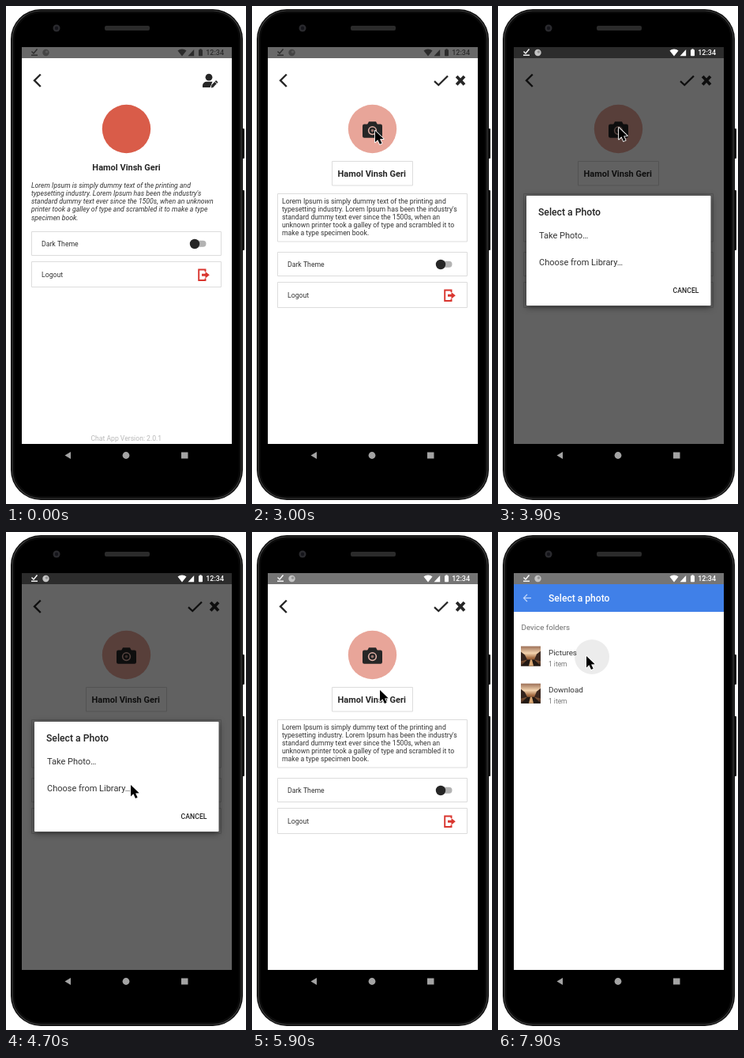
Animation, 304 px wide and 630 px high, one loop 8000 ms. Source, as an HTML page with a canvas:

```html
<!DOCTYPE html>
<html lang="en">
<head>
<meta charset="utf-8">
<title>Chat app profile</title>
<style>
html, body { margin: 0; width: 100%; height: 100%; overflow: hidden; background: #fff; }
canvas { display: block; width: 304px; height: 630px; }
</style>
</head>
<body>
<canvas id="stage"></canvas>
<script>
const W = 304, H = 630, LOOP = 8000;
const canvas = document.getElementById('stage');
const c = canvas.getContext('2d');
const ratio = window.devicePixelRatio || 1;
canvas.width = W * ratio;
canvas.height = H * ratio;

const INK = '#262626', RED = '#d9352e';
const BIO = ['Lorem Ipsum is simply dummy text of the printing and',
  "typesetting industry. Lorem Ipsum has been the industry's"];
const BIO_VIEW = [...BIO, 'standard dummy text ever since the 1500s, when an unknown',
  'printer took a galley of type and scrambled it to make a type', 'specimen book.'];
const BIO_EDIT = [...BIO, 'standard dummy text ever since the 1500s, when an',
  'unknown printer took a galley of type and scrambled it to', 'make a type specimen book.'];
const NAME = 'Hamol Vinsh Geri';

// time, x, y of the pointer tip
const PATH = [[300, 270, 640], [1000, 237, 168], [1300, 237, 168], [1780, 260, 93],
  [2200, 260, 93], [2950, 156, 158], [3400, 153, 154], [3900, 153, 154], [4500, 158, 320],
  [5300, 158, 320], [5850, 162, 200], [6400, 162, 200], [7200, 112, 157], [8000, 112, 157]];

const ramp = (t, a, b) => Math.min(1, Math.max(0, (t - a) / (b - a)));
const smooth = p => p * p * (3 - 2 * p);

function box(x, y, w, h, fill, r = 0) {
  c.fillStyle = fill;
  c.beginPath();
  c.roundRect(x, y, w, h, r);
  c.fill();
}

function frame(x, y, w, h, color = '#dcdcdc', r = 0, width = 1) {
  c.strokeStyle = color;
  c.lineWidth = width;
  c.beginPath();
  c.roundRect(x, y, w, h, r);
  c.stroke();
}

function disc(x, y, r, fill) {
  c.fillStyle = fill;
  c.beginPath();
  c.arc(x, y, r, 0, 7);
  c.fill();
}

function trace(pts) {
  c.beginPath();
  for (let i = 0; i < pts.length; i += 2) c.lineTo(pts[i], pts[i + 1]);
}

function poly(fill, ...pts) {
  trace(pts);
  c.fillStyle = fill;
  c.fill();
}

function line(color, width, ...pts) {
  trace(pts);
  c.strokeStyle = color;
  c.lineWidth = width;
  c.stroke();
}

function text(str, x, y, size = 8.7, color = '#333', style = '400', align = 'left') {
  c.font = `${style} ${size}px Roboto, sans-serif`;
  c.textAlign = align;
  c.fillStyle = color;
  c.fillText(str, x, y);
}

function phone() {
  box(0, 0, W, H, '#fff');
  box(298, 155, 4, 38, '#111', 1);
  box(298, 233, 4, 76, '#111', 1);
  box(6, 4, 294, 621, '#0a0a0a', 38);
  frame(8, 6, 290, 617, '#3b3b3b', 36, 1.2);
  box(11, 9, 284, 611, '#000', 33);
  box(125, 25, 57, 6, '#2b2b2b', 2);
  disc(64, 28, 4.5, '#2a2a2e');
  disc(64, 28, 2.2, '#15151b');
  poly('#a3a3a3', 82, 564, 82, 573, 74.5, 568.5);
  disc(152, 568.5, 4.4, '#a3a3a3');
  box(222, 564.5, 8.5, 8, '#a3a3a3');
}

function statusBar(light) {
  const ink = light ? '#fff' : '#2b2b2b';
  line(ink, 1.4, 32.5, 57.5, 35, 60, 39.5, 54.5);
  box(32, 61.5, 8, 1.4, ink);
  disc(50.5, 59, 4.2, light ? '#c4c4c4' : '#444');
  disc(51.5, 58, 1.8, light ? '#969696' : '#5a5a5a');
  poly(ink, 217.5, 56.5, 220, 55, 223, 54.5, 226, 55, 228.5, 56.5, 223, 63.5);
  poly(ink, 230.5, 63.2, 238.2, 63.2, 238.2, 55);
  box(244, 55.3, 5, 8, ink, .8);
  box(245.4, 54.3, 2.2, 1.5, ink);
  text('12:34', 276, 62.2, 9, ink, '500', 'right');
}

function editUserIcon() {
  disc(257, 90.2, 4.4, INK);
  c.beginPath();
  c.moveTo(249, 103);
  c.lineTo(249, 100);
  c.quadraticCurveTo(250, 96, 254, 95.8);
  c.lineTo(261.5, 95.8);
  c.lineTo(258.5, 103);
  c.fill();
  line(INK, 3.4, 261.5, 101.3, 267.3, 95.3);
  poly(INK, 259.8, 103.5, 260.3, 99.8, 263.2, 102.8);
  line('#fff', .9, 264.3, 95.6, 267.3, 98.4);
}

function cameraIcon() {
  box(140, 149.5, 25, 17.2, INK, 2.2);
  poly(INK, 146, 150, 148, 146.3, 157, 146.3, 159, 150);
  disc(152.5, 157.6, 5.6, '#e6b5aa');
  disc(152.5, 157.6, 4.1, INK);
  disc(152.5, 157.6, 1.8, '#9c7670');
}

function options(y) {
  frame(32.5, y + .5, 240, 30);
  text('Dark Theme', 45, y + 19);
  box(238, y + 11.8, 15.5, 8, '#b3b3b3', 4);
  disc(239, y + 16, 6.2, INK);

  frame(32.5, y + 38.5, 240, 32);
  text('Logout', 45, y + 58);
  line(RED, 1.9, 252.5, y + 51, 252.5, y + 48.5, 244.2, y + 48.5,
    244.2, y + 62, 252.5, y + 62, 252.5, y + 59.5);
  line(RED, 3, 248, y + 55.2, 253.5, y + 55.2);
  poly(RED, 252.5, y + 51, 257.8, y + 55.2, 252.5, y + 59.4);
}

function profile(editing) {
  box(20, 66, 266, 488, '#fff');
  line(INK, 2.4, 43.8, 86.5, 36, 94.2, 43.8, 102);
  disc(152.5, 155.5, 30.7, editing ? '#e8a599' : '#d95c49');
  if (editing) {
    line(INK, 2.3, 231, 95.2, 236.3, 100, 248, 88.5);
    line(INK, 3.8, 259.2, 89, 269, 99.5);
    line(INK, 3.8, 269, 89, 259.2, 99.5);
    cameraIcon();
    frame(101.5, 196.5, 102, 30.5);
    text(NAME, 151.7, 215.7, 11, INK, '700', 'center');
    frame(32.5, 237.5, 240, 60.5);
    BIO_EDIT.forEach((s, i) => text(s, 38, 249.5 + i * 10.15));
    options(311);
  } else {
    editUserIcon();
    text(NAME, 152.5, 208.2, 11, INK, '700', 'center');
    BIO_VIEW.forEach((s, i) => text(s, 32, 230 + i * 10.15, 8.7, '#333', 'italic 400'));
    options(285);
    text('Chat App Version: 2.0.1', 152.3, 550, 8.65, '#b8b8b8', '400', 'center');
  }
}

function dialog(alpha) {
  c.save();
  c.globalAlpha = alpha;
  c.shadowColor = 'rgba(0,0,0,.5)';
  c.shadowBlur = 9 * ratio;
  c.shadowOffsetY = 2 * ratio;
  box(36, 240, 233.5, 139, '#fff', 1);
  c.shadowColor = 'transparent';
  text('Select a Photo', 51, 264.7, 12.2, '#222', '500');
  text('Take Photo…', 52, 294.2, 11);
  text('Choose from Library…', 52, 328, 11);
  text('CANCEL', 254.5, 363, 8.7, '#222', '500', 'right');
  c.restore();
}

function thumb(y) {
  const g = c.createLinearGradient(0, y, 0, y + 25);
  g.addColorStop(0, '#9c7058');
  g.addColorStop(.35, '#f3d3ae');
  g.addColorStop(.6, '#a2693f');
  g.addColorStop(1, '#38241b');
  box(29, y, 25, 25, g);
  poly('#33231d', 29, y + 7, 34, y + 11, 37, y + 17, 29, y + 19);
  poly('#3c281f', 54, y + 6, 49, y + 10, 46, y + 17, 54, y + 19);
  poly('#211813', 29, y + 25, 37, y + 17, 46, y + 17, 54, y + 25);
  poly('#d9a774', 39, y + 25, 41, y + 17, 43, y + 17, 45, y + 25);
}

function folder(label, y) {
  thumb(y);
  text(label, 64, y + 11.2, 9.85);
  text('1 item', 64, y + 25.6, 8.45, '#777');
}

function picker(t) {
  const p = ramp(t, 5920, 6220);
  if (!p) return;
  c.save();
  c.globalAlpha = p;
  c.translate(0, 60 * (1 - p) ** 2);
  box(20, 66, 266, 488, '#fff');
  box(20, 66, 266, 35, '#4080e8');
  line('#c3d8fb', 1.2, 42, 83.5, 32.7, 83.5);
  line('#c3d8fb', 1.2, 37, 79, 32.5, 83.5, 37, 88);
  if (t >= 6450) {
    text('Select a photo', 64, 87.8, 12.1, '#fff', '500');
    text('Device folders', 29.5, 124, 9.75, '#6e6e6e');
    const r = 22 * ramp(t, 7700, 7900);
    if (r) disc(119, 158, r, '#ececec');
    folder('Pictures', 144.5);
    folder('Download', 191.7);
  }
  c.restore();
}

function pointer(t) {
  const i = PATH.findIndex(k => k[0] > t);
  if (i < 1) return;
  const [t0, x0, y0] = PATH[i - 1], [t1, x1, y1] = PATH[i];
  const p = smooth(ramp(t, t0, t1));
  c.save();
  c.translate(x0 + (x1 - x0) * p, y0 + (y1 - y0) * p);
  trace([0, 0, 0, 14.5, 3.4, 11.3, 6, 17, 8.6, 15.8, 6.1, 10.4, 10.7, 10.2]);
  c.closePath();
  c.lineJoin = 'round';
  c.lineWidth = 1.8;
  c.strokeStyle = '#fff';
  c.stroke();
  c.fillStyle = '#000';
  c.fill();
  c.restore();
}

function draw(t) {
  c.setTransform(ratio, 0, 0, ratio, 0, 0);
  phone();
  const light = t >= 3800;
  c.save();
  c.beginPath();
  c.rect(20, 52, 266, 502);
  c.clip();
  box(20, 52, 266, 14, light ? '#757575' : '#696969');
  profile(t >= 2000);
  if (!light) statusBar(false);
  const close = 1 - ramp(t, 5130, 5310);
  const dim = .62 * ramp(t, 3630, 3810) * close;
  if (dim) box(20, 52, 266, 502, `rgba(0,0,0,${dim})`);
  const shown = ramp(t, 3630, 3730) * close;
  if (shown) dialog(shown);
  picker(t);
  if (light) statusBar(true);
  c.restore();
  pointer(t);
}

const start = performance.now();
function tick() {
  draw((performance.now() - start) % LOOP);
  requestAnimationFrame(tick);
}
tick();
</script>
</body>
</html>
```
